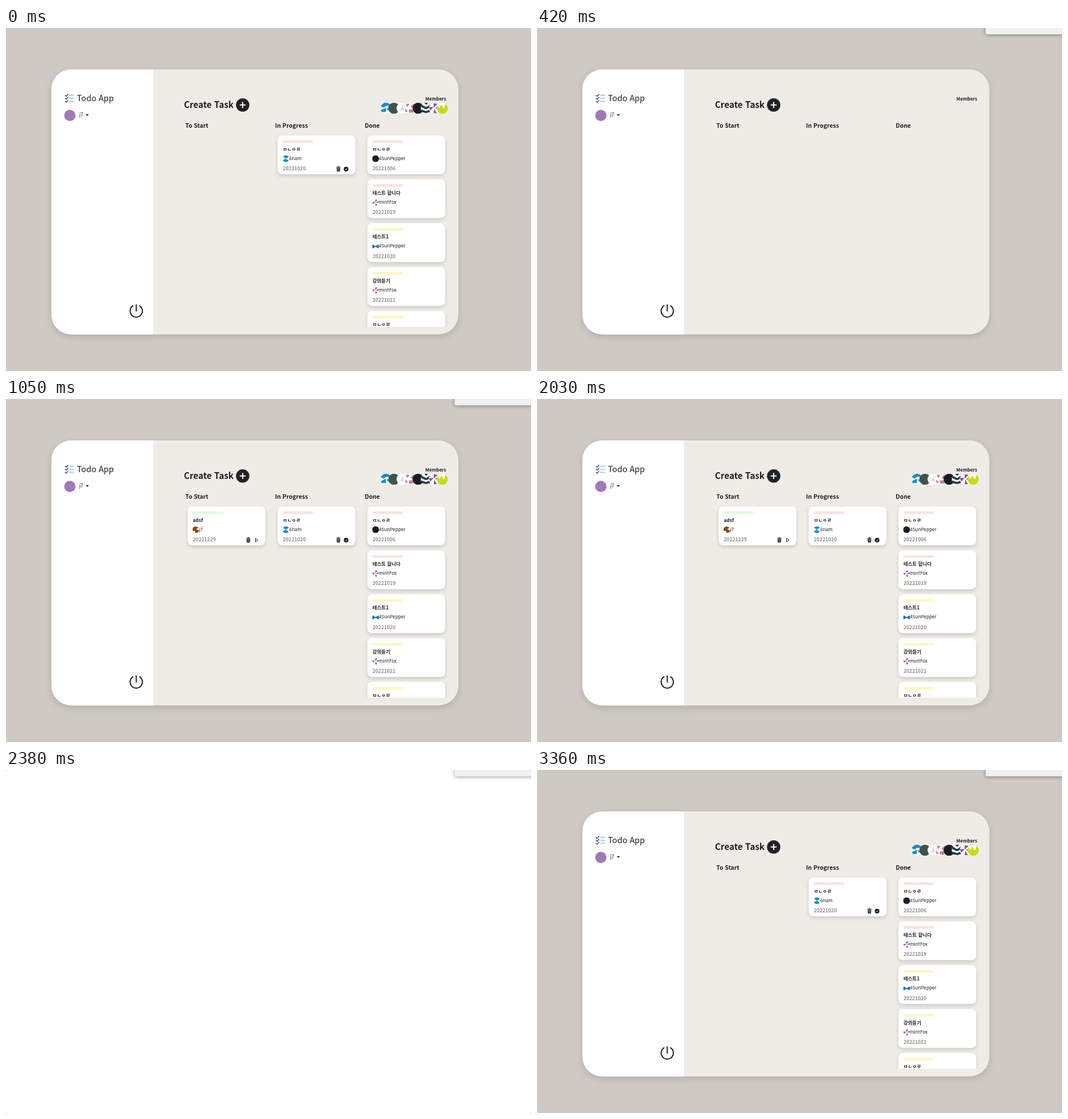
Animation of 925 by 605 pixels, one loop 5.25 s. Source, as an HTML page:

```html
<!DOCTYPE html>
<html lang="ko">
<head>
<meta charset="utf-8">
<title>Todo board</title>
<style>
  html, body { margin: 0; width: 100%; height: 100%; overflow: hidden; background: #8b8986; }
  svg { display: block; width: 925px; height: 605px; border-radius: 2px; background: #fff; }
  text { font-family: "Noto Sans CJK KR", "Noto Sans CJK", "Noto Sans", sans-serif; fill: #1d1e22; }
  .bold { font-weight: 700; }
  .date { font-weight: 700; fill: #8b8b8b; }
  .panel { filter: drop-shadow(0 4px 6px rgba(0, 0, 0, .13)); }
  .sheet { fill: #fff; filter: drop-shadow(0 3px 3px rgba(0, 0, 0, .15)); }
  .popup rect { fill: #f0f0f0; filter: drop-shadow(0 1px 3px rgba(0, 0, 0, .4)); }
  .page, .popup, .loaded, .task { animation: 5250ms step-end infinite; }
  .page { animation-name: page; }
  .popup { animation-name: popup; }
  .loaded { animation-name: loaded; }
  .task { animation-name: task; }
  @keyframes page {
    0%, 8%, 52%, 100% { opacity: 1; }
    1.333%, 45.333% { opacity: 0; }
  }
  @keyframes popup {
    0%, 38.666% { opacity: 0; }
    1.333%, 45.333%, 100% { opacity: 1; }
  }
  @keyframes loaded {
    0%, 18.666%, 64%, 100% { opacity: 1; }
    1.333%, 45.333% { opacity: 0; }
  }
  @keyframes task {
    0%, 41.333%, 100% { opacity: 0; }
    18.666% { opacity: 1; }
  }
</style>
</head>
<body>
<svg viewBox="0 0 925 605">
  <defs>
    <clipPath id="round"><circle r="10"/></clipPath>
    <clipPath id="column"><rect x="625" y="180" width="155" height="347"/></clipPath>
    <g id="trash">
      <path d="M-3.7-3.3h7.4M-1.3-4.1h2.6" stroke="#1d1e22" stroke-width="1.2"/>
      <path d="M-3.2-2.1h6.4l-.5 6.2h-5.4z" fill="#1d1e22"/>
      <path d="M-1.1-1v4M1.1-1v4" stroke="#fff" stroke-width=".6"/>
    </g>
  </defs>

  <g class="page">
    <rect width="925" height="605" fill="#cec9c3"/>
    <g class="panel">
      <rect x="80" y="73" width="717" height="467.5" rx="35" fill="#efece7"/>
      <path d="M259 73H115a35 35 0 0 0-35 35v397.500a35 35 0 0 0 35 35h144z" fill="#fff"/>
    </g>

    <g fill="none" stroke-width="1.400">
      <path d="M104 118.500l2 2 3.500-4M104 123.800l2 2 3.500-4M104 129.100l2 2 3.500-4" stroke="#343778"/>
      <path d="M111.500 118.700h8.500M111.500 124h8.500M111.500 129.300h8.500" stroke="#90c9e6" stroke-width="1.700"/>
    </g>
    <text x="125" y="129.300" font-size="14.500">Todo App</text>
    <circle cx="112.500" cy="154.300" r="10" fill="#9f7ab8"/>
    <text x="129" y="156.300" font-size="8.500">j7</text>
    <path d="M140.500 152h5.400l-2.700 2.900z" fill="#1d1e22"/>
    <path d="M224.300 489.700a10.800 10.800 0 1 0 10.400 0M229.500 487.500v12.500" fill="none" stroke="#1d1e22" stroke-width="2"/>

    <g class="bold">
      <text x="313.500" y="141" font-size="15.300" class="bold">Create Task</text>
      <text x="316" y="176" font-size="10.400">To Start</text>
      <text x="474" y="176" font-size="10.400">In Progress</text>
      <text x="632" y="176" font-size="10.400">Done</text>
      <text x="738.800" y="127.700" font-size="8.100">Members</text>
    </g>
    <circle cx="417" cy="135.800" r="11.800" fill="#212226"/>
    <path d="M411.800 135.800h10.400M417 130.600v10.400" stroke="#fff" stroke-width="1.900"/>

    <g class="loaded" id="loaded"></g>
  </g>

  <g class="popup"><rect x="790.500" y="-10" width="150" height="21.300" rx="3"/></g>
</svg>

<script>
  // Geometric avatars, each drawn in a circle of radius 10.
  const disc = 'M-10-10H10V10H-10z';
  const avatars = {
    blue: ['#168bd2', 'M-10-7L0 0L10-7V-10H-10zM0 0L10 7V10H-8L-10 5z'],
    sky: ['#168bd2', 'M-10-4L-3-10H10V-4H0L-4-1zM-10 4L0-1V7H-10zM2 0H10V9L2 2z'],
    moss: ['#40534e', disc],
    pale: ['#dedede', 'M-4 4L1-6L4 4zM4-8L9 2H5z'],
    rose: ['#cc7890', 'M-8-8H-1L-5-2zM1-3L6-8L10-3L6 2zM-9 1L-4 5L-9 9zM-2 2H6V8H-2z'],
    black: ['#1c1d20', disc],
    teal: ['#203f49', 'M-9-7L0-2L9-8V-3L0 2L-9-2zM-9 2L0 5L9 1V6L0 9L-8 7zM-4-10H4L0-6z'],
    violet: ['#8d5198', 'M-1-9L6-8L-1-1zM1 0L9-5V1zM0 1L5 9H-1zM-10-2H-1L-7 4z'],
    lime: ['#c5dc16', 'M-10-8L-5 0L-2-7L3 1L6-8L10-3V10H-10z'],
    bow: ['#2773bd', 'M-10-7L0-1L10-7V7L0 1L-10 7z'],
    brown: ['#91450f', 'M-10-5L-2-10L9-6L1-2L10 3L6 10L-3 8L-2 3L-10 4z']
  };
  const colors = { green: '#dcfce3', pink: '#fae1e2', yellow: '#fcf8c2' };

  const avatar = (name, x, y, r) => {
    const [color, shape] = avatars[name];
    return `<g transform="translate(${x} ${y}) scale(${r / 10})" clip-path="url(#round)">
      <circle r="10" fill="#fff"/><path d="${shape}" fill="${color}"/></g>`;
  };

  const card = (x, y, bar, title, face, user, date, icons = '') => `
    <g transform="translate(${x} ${y})">
      <rect class="sheet" width="137" height="68.500" rx="8"/>
      <rect x="9" y="8.700" width="53" height="4.600" fill="${colors[bar]}"/>
      <text class="bold" x="9" y="27.200" font-size="8.500">${title}</text>
      ${avatar(face, 14.5, 41, 6)}
      <text x="20.300" y="43" font-size="8.200">${user}</text>
      <text class="date" x="9" y="61.500" font-size="8.600">${date}</text>
      ${icons}
    </g>`;

  const trash = '<use href="#trash" x="107" y="59.300"/>';
  const play = '<path d="M119.500 56.400l4.300 3.100-4.300 3.100z" fill="none" stroke="#1d1e22"/>';
  const check = `<circle cx="120.500" cy="59.400" r="4.100" fill="#1d1e22"/>
    <path d="M118.600 59.500l1.400 1.400 2.500-2.800" fill="none" stroke="#fff"/>`;

  const members = ['sky', 'moss', 'pale', 'rose', 'black', 'teal', 'violet', 'lime'];
  const done = [
    ['pink', 'ㅁㄴㅇㄹ', 'black', '4SunPepper', '20221006'],
    ['pink', '테스트 합니다', 'violet', 'mintFox', '20221019'],
    ['yellow', '테스트1', 'bow', '4SunPepper', '20221020'],
    ['yellow', '강의듣기', 'violet', 'mintFox', '20221021'],
    ['yellow', 'ㅁㄴㅇㄹ', 'black', '4SunPepper', '20221021']
  ];

  document.getElementById('loaded').innerHTML =
    members.map((name, i) => avatar(name, 669.3 + i * 14.2, 141.5, 9.8)).join('') +
    `<g class="task">${card(320, 189.5, 'green', 'adsf', 'brown', 'j7', '20221229', trash + play)}</g>` +
    card(478.7, 189.5, 'pink', 'ㅁㄴㅇㄹ', 'blue', '6nam', '20221020', trash + check) +
    `<g clip-path="url(#column)">${done.map((item, i) => card(636.7, 189.5 + i * 77.4, ...item)).join('')}</g>`;
</script>
</body>
</html>
```
